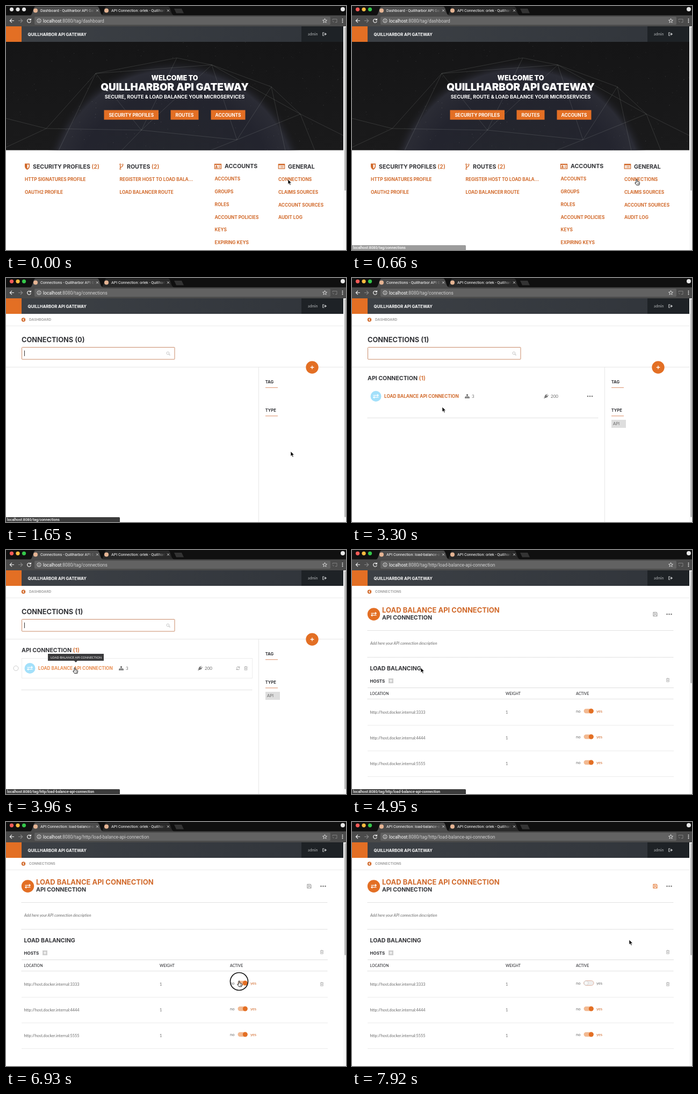
Recreate the animation shown at these times as an HTML page. Size 633x456 px, loop 8000 ms.

```html
<!DOCTYPE html>
<html lang="en">
<head>
<meta charset="utf-8">
<title>API gateway console</title>
<style>
  html, body { margin: 0; width: 100%; height: 100%; overflow: hidden; background: #fff; }
  svg { display: block; }
  text { white-space: pre; }
  .head { font-family: Inter, sans-serif; font-weight: 700; }
  .body { font-family: Lato, sans-serif; }
  .ui { font-family: Roboto, sans-serif; }
</style>
</head>
<body>
<svg id="stage" width="633" height="456" viewBox="0 0 633 456"></svg>
<script>
const STEP = 330, LOOP = 8000;
const PRODUCT = 'Quillharbor', GATEWAY = PRODUCT.toUpperCase() + ' API GATEWAY';
const ORANGE = '#e36f24', LINK = '#d1692a', DARK = '#323337', GREY = '#6c6c6c';
const CONNECTION = 'LOAD BALANCE API CONNECTION';
const BASE_URL = 'localhost:8080', LIST_PATH = '/tag/connections',
      DETAIL_PATH = '/tag/http/load-balance-api-connection';

// Cursor stops: first step, x, y, shape
const STOPS = [
  [0, 525, 324, 'arrow'], [2, 530, 324, 'hand'], [5, 530, 324, 'arrow'], [9, 340, 296, 'arrow'],
  [10, 168, 241, 'arrow'], [11, 128, 220, 'hand'], [15, 128, 220, 'arrow'], [17, 136, 220, 'arrow'],
  [18, 290, 270, 'arrow'], [19, 425, 300, 'hand'], [20, 434, 297, 'hand'], [24, 516, 220, 'arrow']
];
const CLICKS = [4, 13, 21];

const text = (x, y, str, size, fill, cls = 'head', more = '') =>
  `<text x="${x}" y="${y}" font-size="${size}" fill="${fill}" class="${cls}" ${more}>${str}</text>`;
const centered = (y, str, size, weight = 700, x = 314) =>
  text(x, y, str, size, '#fff', 'head', `text-anchor="middle" style="font-weight:${weight}"`);
const rect = (x, y, w, h, fill, more = '') =>
  `<rect x="${x}" y="${y}" width="${w}" height="${h}" fill="${fill}" ${more}/>`;
const disc = (x, y, r, fill, more = '') => `<circle cx="${x}" cy="${y}" r="${r}" fill="${fill}" ${more}/>`;
const line = (d, color, width = 1, more = '') =>
  `<path d="${d}" fill="none" stroke="${color}" stroke-width="${width}" ${more}/>`;
const at = (x, y, content) => `<g transform="translate(${x} ${y})">${content}</g>`;
const dotted = (y, x2) => line(`M29 ${y}H${x2}`, '#c4c4c4', 1, 'stroke-dasharray="1 1"');
const dots = (x, y) => [-4, 0, 4].map(d => disc(x + d, y, 1.3, '#777')).join('');
const plus = (r, color, width) => line(`M${-r} 0H${r}M0 ${-r}V${r}`, color, width);

const icons = {
  trash: line('M-3-2.5H3M-1-3.5H1M-2.3-2.5V3.3H2.3V-2.5M-.8-1V2M.8-1V2', '#aaa', .8),
  swap: line('M-5-1.7H4.5M2.5-3.7 4.7-1.7 2.5.2M5 1.9H-4.5M-2.5 0-4.7 1.9-2.5 3.9', '#fff', 1.2),
  tree: rect(-1.5, -4, 3, 2.5, GREY) + line('M0-2V2M-3 2V0H3V2', GREY, .8) +
    [-4.3, -1.3, 1.7].map(x => rect(x, 1, 2.6, 2.6, GREY)).join(''),
  plug: `<g transform="rotate(45)">${rect(-2.8, -1.5, 5.6, 2, GREY)}` +
    `<path d="M-2.3.5H2.3Q2 3.5 0 3.5T-2.3.5" fill="${GREY}"/>${line('M-1.4-4.3V-1M1.4-4.3V-1M0 3V5.5', GREY, 1.1)}</g>`,
  refresh: line('M-2.7-.5A2.8 2.8 0 0 1 2.3-1.7M2.7.5A2.8 2.8 0 0 1-2.3 1.7M2.8-3.3V-1.2H.7M-2.8 3.3V1.2H-.7', '#999', .9),
  shield: `<path d="M-4.5-5.5H4.5V0Q4 4 0 6-4 4-4.5 0Z" fill="${LINK}"/><path d="M0-3.8H3V0Q2.5 2.6 0 4Z" fill="#fff"/>`,
  branch: line('M-2.3-3V4M2.3-2.5Q2.3.5-2.3 1.8', LINK, 1.3) +
    [[-2.3, -4], [2.3, -3.5], [-2.3, 4.5]].map(([x, y]) => disc(x, y, 1.2, '#fff', `stroke="${LINK}"`)).join(''),
  card: rect(-6, -4, 12, 8.5, 'none', `stroke="${LINK}" stroke-width="1.3"`) + rect(-6, -4.5, 12, 2, LINK) +
    disc(-2.5, -.5, 1.3, LINK) + rect(-4.5, 1, 4, 2, LINK) + line('M1-.5H4.5M1 2H4.5', LINK),
  panel: rect(-5.7, -4, 11.4, 8.5, 'none', `stroke="${LINK}" stroke-width="1.2"`) + rect(-6, -4.5, 12, 2.6, LINK) +
    line('M-4 0H-3M-2 0H4M-4 2.3H-3M-2 2.3H4', LINK, .9),
  back: disc(0, 0, 3.7, LINK) + line('M1-2-1 0 1 2', '#fff', 1.1),
  logout: line('M-.5-2.8H-3.2V2.8H-.5M-1.5 0H2.5', '#c5c7c9', 1.1) + '<path d="M.8-2.7 4 0 .8 2.7Z" fill="#c5c7c9"/>',
  search: disc(-.6, -.6, 2.4, 'none', 'stroke="#c4c4c4"') + line('M1.2 1.2 3.5 3.5', '#c4c4c4', 1.2)
};
const saveIcon = color => line('M-3.7-3.7H2.5L3.7-2.5V3.7H-3.7ZM-2-3.5V-1H1.8V-3.5M-2.2 3.5V.8H2.2V3.5', color, .9);

const cursors = {
  arrow: '<path d="M0 0V9.2L2.1 7.3 3.6 10.7 5.2 10 3.7 6.7H6.6Z" fill="#000" stroke="#fff" stroke-width=".7"/>',
  hand: '<path d="M-1 .5Q0-.7 1 .5V4L4.8 4.9Q5.9 5.3 5.6 7L4.6 10.7H-.2L-3.2 6.7Q-3.1 5.2-1 6.5Z" fill="#fff" stroke="#000" stroke-width=".9"/>' +
    line('M2 6.5V9M3.6 6.5V9', '#000', .6)
};

function random(seed) {
  return () => (seed = seed * 16807 % 2147483647) / 2147483647;
}

const hero = (() => {
  const rnd = random(42);
  let stars = '';
  for (let i = 0; i < 220; i++)
    stars += disc((rnd() * 628).toFixed(1), (67 + rnd() * 203).toFixed(1), .5, '#fff', `opacity="${(rnd() * .26).toFixed(2)}"`);
  const mesh = line('M0 264 75 229 167 126 318 97 383 110 494 151 548 202 628 242M167 126 98 270M167 126 383 110' +
    'M167 126 252 232 318 97M252 232 383 110 430 250 494 151M75 229 252 232 430 250 548 202M383 110 548 202 575 270' +
    'M494 151 520 270M252 232 215 270M430 250 380 270M0 210 75 229', '#d7d9d5', .6, 'opacity=".25"');
  return `<svg x="0" y="67" width="628" height="202.5" viewBox="0 67 628 202.5">` +
    rect(0, 67, 628, 203, 'url(#sky)') + disc(313, 348, 248, 'url(#globe)') + stars + mesh + '</svg>';
})();

const defs = `<defs>
  <linearGradient id="sky" x2="0" y2="1"><stop stop-color="#151516"/><stop offset="1" stop-color="#1a1a1b"/></linearGradient>
  <radialGradient id="globe"><stop offset=".3" stop-color="#24262d"/><stop offset=".75" stop-color="#23242e"/>
    <stop offset=".92" stop-color="#2b2c35"/><stop offset="1" stop-color="#18181a" stop-opacity="0"/></radialGradient>
  <linearGradient id="bar"><stop stop-color="#3d4146"/><stop offset="1" stop-color="#30343a"/></linearGradient>
  <linearGradient id="fadeA"><stop stop-color="#4b4b4b" stop-opacity="0"/><stop offset="1" stop-color="#4b4b4b"/></linearGradient>
  <linearGradient id="fadeB"><stop stop-color="#292929" stop-opacity="0"/><stop offset="1" stop-color="#292929"/></linearGradient>
</defs>`;

function tab(x, title, fill, fade) {
  return `<path d="M${x} 18Q${x + 3} 17 ${x + 5} 9T${x + 10} 1H${x + 125}Q${x + 128} 1 ${x + 130} 9T${x + 136} 18Z" fill="${fill}"/>` +
    disc(x + 10, 8.5, 4, '#e5b493') +
    `<svg x="${x + 19}" y="0" width="101" height="17">${text(0, 11.3, title, 7.2, '#fff', 'ui')}${rect(84, 2, 17, 14, `url(#${fade})`)}</svg>` +
    at(x + 125, 8.5, line('M-2-2 2 2M2-2-2 2', '#ddd', .9));
}

function browser(title, path, active) {
  const lights = active ? ['#fc5b57', '#fdbc40', '#34c84a'] : ['#e4e4e4', '#e4e4e4', '#e4e4e4'];
  return rect(0, 0, 633, 38, '#101010') +
    lights.map((c, i) => disc(10.5 + i * 11.5, 6.3, 3.6, c)).join('') +
    tab(177, 'API Connection: orlek - ' + PRODUCT, '#292929', 'fadeB') + tab(45, title, '#4b4b4b', 'fadeA') +
    '<path d="M313 5H327L331 13.5H317Z" fill="#333"/>' + disc(627, 6, 4, '#e8e8e8') +
    rect(0, 17.5, 633, 20.5, '#4b4b4b') + rect(53, 20, 551, 15, '#626262', 'rx="2"') +
    at(11, 27.5, line('M4 0H-3.5M0-3.7-3.7 0 0 3.7', '#eee', 1.2)) +
    at(27, 27.5, line('M-4 0H3.5M0-3.7 3.7 0 0 3.7', '#888', 1.2)) +
    at(43, 27.5, line('M2.6-2A3.4 3.4 0 1 0 3.3 1M3.4-4V-1.3H.7', '#eee', 1.2)) +
    at(61.5, 27.5, disc(0, 0, 3.6, 'none', 'stroke="#eee" stroke-width=".9"') + line('M0-.5V2M0-2V-1', '#eee', .9)) +
    text(69, 30.5, `${BASE_URL.split(':')[0]}<tspan fill="#d0d0d0">:8080${path}</tspan>`, 8.4, '#fff', 'ui') +
    at(593.5, 27.5, line('M0-4 1.2-1.2 4-1 1.8.8 2.6 3.6 0 2-2.6 3.6-1.8.8-4-1-1.2-1.2Z', '#eee', .8)) +
    at(612, 27.5, line('M-4-1V-3H4V3H1M-4 1Q-2 1-2 3', '#858585', .9)) +
    [-3, 0, 3].map(d => disc(626.5, 27.5 + d, 1, '#eee')).join('');
}

const topBar = rect(0, 38, 628, 29, 'url(#bar)') + rect(550, 38, 78, 29, '#1e2226') + rect(0, 38, 29, 29, ORANGE) +
  text(40.5, 55.7, GATEWAY, 7.65, '#fff') + text(562, 55, 'admin', 6.8, '#b0b3b5', 'body') + at(593, 52.5, icons.logout);

const scrollbar = bottom => rect(628, 38, 5, 418, '#f8f8f8') + rect(630, 39, 3, bottom - 39, '#bdbdbd', 'rx="1.5"');

const breadcrumb = label => at(32.5, 78, icons.back) + text(43, 80.3, label, 6.5, '#a2a2a2') +
  line('M0 89.5H628', '#ebebeb');

const heading = (x, y, label, count) =>
  text(x, y, `${label}${count ? ` <tspan fill="${LINK}" font-weight="600">(${count})</tspan>` : ''}`, 10.6, DARK);

function dashboard() {
  const button = (x, w, label) => rect(x, 194.5, w, 18, ORANGE) + centered(206.6, label, 8.3, 700, x + w / 2);
  const links = (x, y, labels) =>
    labels.map((label, i) => text(x, y + i * 23.75, label, 8.28, LINK)).join('');
  return topBar + hero +
    centered(138.6, 'WELCOME TO', 12.5, 900) + centered(158.4, GATEWAY, 18.9, 900) +
    centered(172.7, 'SECURE, ROUTE &amp; LOAD BALANCE YOUR MICROSERVICES', 9.13) +
    button(182.5, 101.5, 'SECURITY PROFILES') + button(306.5, 52, 'ROUTES') + button(381.5, 64, 'ACCOUNTS') +
    at(39.5, 300, icons.shield) + heading(50, 303.8, 'SECURITY PROFILES', 2) +
    links(35, 327.4, ['HTTP SIGNATURES PROFILE', 'OAUTH2 PROFILE']) +
    at(215, 300, icons.branch) + heading(225, 303.8, 'ROUTES', 2) +
    links(211.5, 327.4, ['REGISTER HOST TO LOAD BALA...', 'LOAD BALANCER ROUTE']) +
    at(394.5, 299.5, icons.card) + heading(407, 303.3, 'ACCOUNTS') +
    links(388.5, 326.3, ['ACCOUNTS', 'GROUPS', 'ROLES', 'ACCOUNT POLICIES', 'KEYS', 'EXPIRING KEYS']) +
    at(513, 299.5, icons.panel) + heading(525, 303.8, 'GENERAL') +
    links(507, 327, ['CONNECTIONS', 'CLAIMS SOURCES', 'ACCOUNT SOURCES', 'AUDIT LOG']) + scrollbar(345);
}

function connectionRow(hover, tooltip) {
  return heading(29, 191.3, 'API CONNECTION', 1) +
    (hover ? rect(29.5, 202.5, 429, 37, 'none', 'stroke="#ececec"') + disc(18.5, 221, 4.5, '#fff', 'stroke="#c4c4c4" stroke-width=".9"') +
      at(432, 221, icons.refresh) + at(446.5, 221, icons.trash) : dots(443, 221)) +
    disc(44.5, 221, 10, '#a3e0fa') + at(44.5, 221, icons.swap) +
    text(60, 224, CONNECTION, 8.25, hover ? '#e98d50' : LINK) +
    at(214.5, 221.3, icons.tree) + text(223, 224, '3', 8, GREY, 'body') +
    at(361.5, 221, icons.plug) + text(370, 224, '200', 8, GREY, 'body') + dotted(261.5, 459) +
    (tooltip ? '<path d="M78 194H182V207H133L130 210 127 207H78Z" fill="#3a3a3c"/>' +
      text(83, 202.7, CONNECTION, 5.9, '#f4f4f4', 'body') : '') +
    rect(483, 265, 27, 15, '#dedede') + text(486, 275.4, 'API', 7.8, GREY, 'body');
}

function connections(step) {
  const loaded = step >= 6;
  const caretOn = (step * STEP - 1400) % 1060 < 530;
  const filter = (y, label) => text(482.7, y, label, 7.6, DARK) + line(`M483 ${y + 7.5}H506`, '#d98a63');
  return topBar + breadcrumb('DASHBOARD') + text(29, 119.7, `CONNECTIONS (${loaded ? 1 : 0})`, 12.8, DARK) +
    rect(29.5, 129.5, 284.5, 22.5, '#fff', 'stroke="#c98b69" rx="1"') + at(302, 141, icons.search) +
    (caretOn ? line('M34.5 135.5V146', '#333') : '') +
    line('M0 166.5H628M470.5 167V456', '#e6e6e6') +
    filter(197.3, 'TAG') + filter(250.3, 'TYPE') +
    disc(570, 167, 11.7, ORANGE) + at(570, 167, plus(3.3, '#fff', 1.3)) +
    (loaded ? connectionRow(step >= 11, step >= 12) : '') + scrollbar(447);
}

function hostRow(y, port, active, hover) {
  const toggle = active
    ? rect(431.5, y - 4.2, 18, 8.4, '#f2b991', 'rx="4.2"') + disc(445.3, y, 4.5, ORANGE)
    : rect(431.5, y - 4.4, 18.5, 8.8, '#eee', 'rx="4.4" stroke="#dda794" stroke-width=".9"') +
      disc(436, y, 4, '#f7f7f7', 'stroke="#ccc" stroke-width=".7"');
  return text(33.5, y + 4.6, 'http://host.docker.internal:' + port, 7.4, GREY, 'body') +
    text(286, y + 4.6, '1', 7.4, GREY, 'body') +
    text(417, y + 2.7, 'no', 7.6, GREY, 'body') + toggle +
    text(455, y + 2.7, 'yes', 7.6, active ? LINK : GREY, 'body') +
    (hover ? at(588, y + 2, icons.trash) : '') + line(`M29 ${y + 26.5}H599`, '#ebebeb');
}

function detail(step) {
  const column = (x, label) => text(x, 270.8, label, 7, DARK, 'body', 'font-weight="500"');
  return topBar + breadcrumb('CONNECTIONS') + disc(40.5, 120, 11.7, ORANGE) + at(40.5, 120, icons.swap) +
    text(56, 117.2, CONNECTION, 13, LINK) + heading(56, 129.8, 'API CONNECTION') +
    at(564.5, 120, saveIcon(step >= 23 ? ORANGE : '#999')) + dots(590.5, 120) +
    dotted(150.5, 599) + text(34, 177, 'Add here your API connection description', 7.3, GREY, 'body', 'font-style="italic"') +
    dotted(200.5, 599) + heading(33.5, 224.6, 'LOAD BALANCING') + text(33.5, 247.6, 'HOSTS', 8, DARK) +
    rect(68, 240, 9, 9, '#cfcfcf') + at(72.5, 244.5, plus(2.5, '#fff', 1.2)) + at(588, 243, icons.trash) +
    line('M29 257.5H599', '#dedede') + column(33.5, 'LOCATION') + column(286, 'WEIGHT') + column(417, 'ACTIVE') +
    dotted(278.5, 599) +
    [3333, 4444, 5555].map((port, i) =>
      hostRow(301 + i * 48, port, i > 0 || step < 22, i === 0 && step >= 19)).join('') + scrollbar(249);
}

function statusBar(step) {
  const path = step >= 2 && step < 6 ? LIST_PATH : step >= 11 && step < 17 ? DETAIL_PATH : '';
  const opacity = step === 2 || step === 16 ? .5 : 1;
  return path && `<g opacity="${opacity}">${rect(-2, 447, 214, 11, '#3b3b3b', 'rx="1.5"')}` +
    text(2, 454.3, BASE_URL + path, 6.8, '#fff', 'ui', 'font-weight="500"') + '</g>';
}

function pointer(step) {
  const [, x, y, shape] = STOPS.filter(stop => stop[0] <= step).pop();
  const ring = CLICKS.includes(step) ? disc(0, 1, 16.5, 'none', 'stroke="#111" stroke-width="1.6"') : '';
  return at(x, y, ring + cursors[shape]);
}

function scene(step) {
  const [title, path, page] =
    step < 5 ? [`Dashboard - ${PRODUCT} API Gateway`, '/tag/dashboard', dashboard()] :
    step < 15 ? [`Connections - ${PRODUCT} API Gateway`, LIST_PATH, connections(step)] :
    ['API Connection: load-balance-api', DETAIL_PATH, detail(step)];
  return defs + rect(0, 0, 633, 456, '#fff') + page + browser(title, path, step > 0) + statusBar(step) + pointer(step);
}

const stage = document.getElementById('stage');
let shown = -1;
function tick() {
  const step = Math.floor(performance.now() % LOOP / STEP);
  if (step !== shown) stage.innerHTML = scene(shown = step);
  requestAnimationFrame(tick);
}
tick();
</script>
</body>
</html>
```
